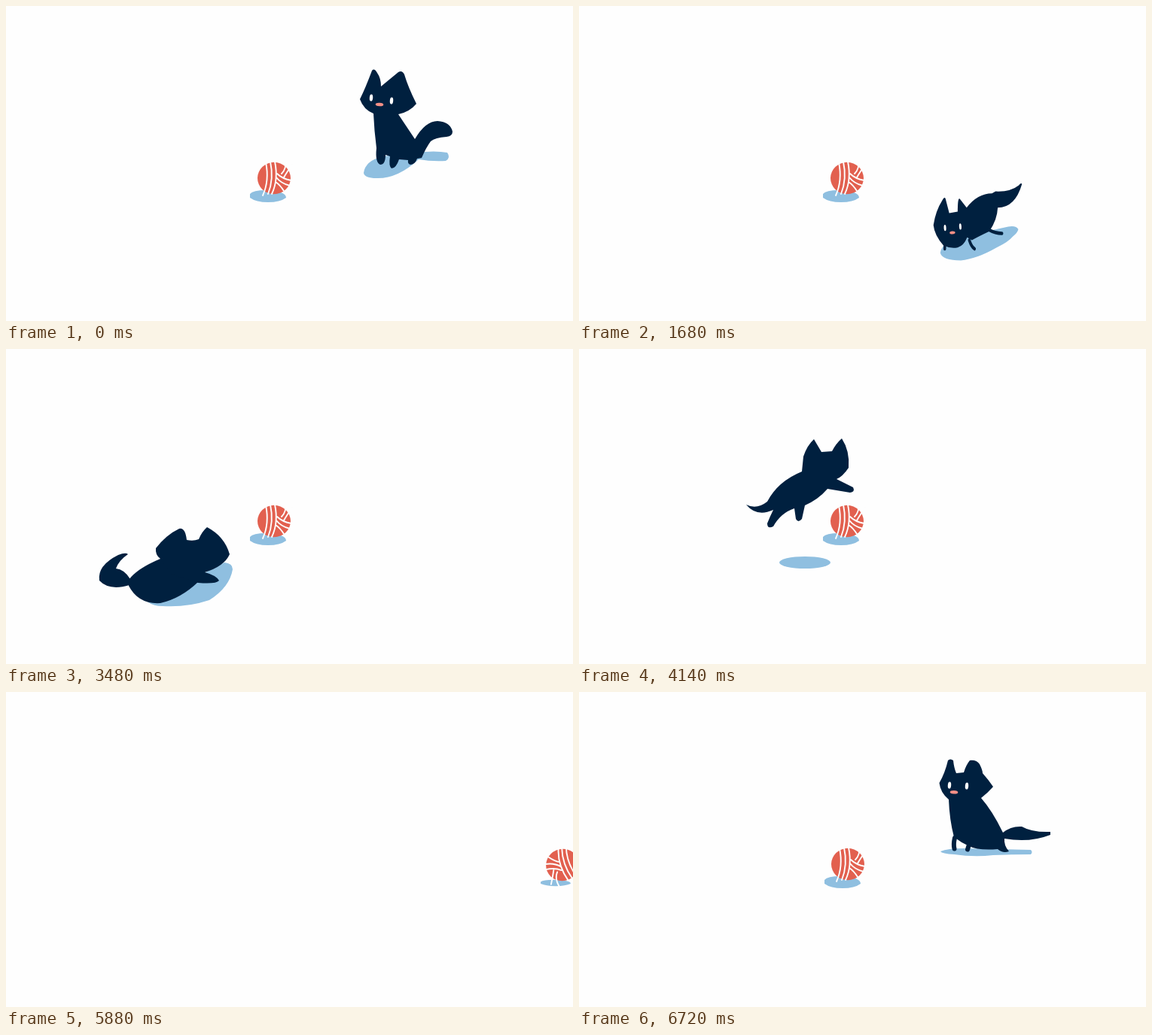
Animation of 753x419 px, one loop 6.84 s. Source, as an HTML page with a canvas:

```html
<!DOCTYPE html>
<html lang="en">
<head>
<meta charset="utf-8">
<title>Cat and yarn</title>
<style>
html, body { margin: 0; width: 100%; height: 100%; overflow: hidden; background: #fefefe; }
canvas { display: block; width: 753px; height: 419px; }
</style>
</head>
<body>
<canvas id="stage"></canvas>
<script>
const W = 753, H = 419, LOOP = 6840, STEP = 120;
const NAVY = '#00203f', BLUE = '#8fbfe0', RED = '#e2604f', PINK = '#f58f86', WHITE = '#fefefe';
const canvas = document.getElementById('stage');
const ctx = canvas.getContext('2d');
const dpr = window.devicePixelRatio || 1;
canvas.width = W * dpr;
canvas.height = H * dpr;

const path = d => new Path2D(d);

function fill(shape, color) {
  ctx.fillStyle = color;
  ctx.fill(shape);
}

function line(shape, color, width) {
  ctx.strokeStyle = color;
  ctx.lineWidth = width;
  ctx.lineCap = ctx.lineJoin = 'round';
  ctx.stroke(shape);
}

function oval(x, y, rx, ry, color, turn = 0) {
  ctx.fillStyle = color;
  ctx.beginPath();
  ctx.ellipse(x, y, rx, ry, turn, 0, Math.PI * 2);
  ctx.fill();
}

function group(draw) {
  ctx.save();
  draw();
  ctx.restore();
}

// Yarn, drawn around its own centre
const strands = path('M-11-21Q-6 3-15 23M-5-22Q0 1-8 21M1-22Q6 2-3 21' +
  'M15-25Q17-13 10-6M24-18Q17-8 13-1M4-6Q11 1 23 3M3-1Q9 7 21 10M2 5Q8 9 13 17');
const yarnShadow = path('M-24-3Q-20-8-3-8Q24-7 24 2Q16 8 0 8Q-16 8-24 2Z');

function yarn(x, y, turn, size = 1) {
  group(() => {
    ctx.translate(x, y);
    ctx.rotate(turn);
    ctx.scale(size, size);
    oval(0, 0, 22, 21.2, RED);
    line(strands, WHITE, 1.9);
  });
}

function groundYarn(x = 356, shadowX = 348, turn = 0, far = 0) {
  group(() => {
    ctx.translate(shadowX, 253 + far);
    ctx.scale(1 - far * 0.17, 1 - far * 0.48);
    fill(yarnShadow, BLUE);
  });
  yarn(x, 229 + far, turn);
}

// Cat poses; "at" is the point used for placing, scaling and turning
const sit = {
  at: [530, 205],
  shadow: path('M475 222Q477 206 500 200L545 195Q570 192 586 195Q591 202 584 206Q565 207 548 204Q520 230 492 229Q476 229 475 222Z'),
  body: path('M486 86Q489 82 493 89Q498 96 498 107L521 88Q526 85 529 91Q534 108 545 130Q536 141 521 144' +
    'L543 177Q557 153 573 153Q590 154 593 167Q593 173 585 174Q570 175 564 180Q558 188 552 202L546 203' +
    'Q543 211 537 211Q533 210 534 205L522 204Q518 216 512 216Q508 213 510 200L504 198Q504 211 497 211' +
    'Q490 208 492 189Q489 166 488 143Q475 138 470 124Q477 110 486 86Z'),
  eyes: [[485, 122], [512, 126]], nose: [496, 131]
};

const prowl = {
  at: [547, 230],
  shadow: path('M469 240Q473 234 488 236L600 255Q617 268 617 275Q613 286 578 286Q548 284 510 267Q487 258 480 251Q470 245 469 240Z'),
  body: path('M462 173Q464 171 468 175Q484 185 512 184L519 187Q546 187 567 208L580 195Q584 192 584 214L600 216' +
    'L607 195Q609 191 613 197Q626 213 630 234Q628 249 611 264Q598 269 584 267Q572 264 566 252L557 256' +
    'Q543 250 524 243Q509 226 508 208Q475 208 462 173Z'),
  legs: path('M524 241Q513 246 500 246M562 256Q558 266 552 269M608 260L608.5 269'),
  legWidth: 5,
  eyes: [[579, 236], [608, 238]], nose: [594, 245]
};

const back = {
  at: [222, 340],
  shadow: path('M168 336Q170 330 190 334L260 343Q275 360 273 371Q266 381 245 378Q205 368 184 353Q169 342 168 336Z'),
  body: path('M194 207Q197 203 200 209Q204 216 204 234L207 235Q220 219 232 214Q241 212 242 222Q244 246 251 268' +
    'Q244 275 235 279Q239 286 250 294Q269 310 271 333L262 346Q226 345 207 338Q183 331 176 316' +
    'Q172 295 180 272Q168 264 166 249Q170 228 194 207Z'),
  legs: path('M177 313L186.500 340M190 325Q196 336 207 342M222 341L231 357M239 342L248 354'),
  legWidth: 6,
  tail: path('M262 334Q283 331 297 336Q310 343 326 340Q328 342 321 347Q308 357 288 353Q272 351 262 347Z'),
  pivot: [264, 341]
};

const stalk = {
  at: [230, 342],
  shadow: path('M189 337L290 284Q301 285 301 293Q297 317 270 334Q240 344 208 342Q196 342 189 337Z'),
  body: path('M199 265Q213 247 230 239Q238 237 240 254Q249 256 256 253Q260 243 267 237Q290 249 297 273' +
    'Q290 289 264 297Q279 301 283 308Q279 313 255 311L220 300L205 279Q198 274 199 265Z'),
  rump: path('M205 279Q174 292 163 307V315Q176 340 205 338Q232 332 255 310L268 285Z'),
  tail: path('M165 306Q157 293 146 292Q150 281 162 273Q159 270 149 274Q121 288 124 308Q137 322 164 314Z'),
  pivot: [163, 310]
};

const leap = {
  at: [293, 180],
  shadow: path('M266 284a34 8 0 1 0 68 0a34 8 0 1 0-68 0'),
  body: path('M222 207Q236 214 250 203Q264 176 296 163L298 143Q303 128 312 120L322 137L336 136Q341 126 349 119' +
    'Q360 136 358 158Q350 170 342 173L364 184Q367 190 360 191L330 186Q318 200 300 208L296 226' +
    'Q291 232 288 226L286 212Q268 218 258 236Q250 240 250 232Q254 222 258 214Q236 224 222 207Z')
};

const hug = {
  at: [555, 205],
  shadow: path('M505 256Q506 249 520 248L612 246Q620 251 629 251Q619 253 614 258Q595 260 540 260Q510 260 505 256Z'),
  behind: () => yarn(571, 216, 1.75, 0.83),
  body: path('M594 141Q598 138 598 147Q596 156 599 168Q602 184 591 194Q578 203 557 197Q551 212 557 226Q569 237 569 249' +
    'Q564 261 546 261Q520 258 514 230Q514 184 553 163V159Q572 147 594 141Z'),
  rump: path('M567 239Q580 235 596 237Q609 233 618 228Q622 226 620 232Q610 247 595 248Q579 249 567 243Z'),
  legs: path('M553 205L568 204.500M554 228Q568 225 573 220'),
  legWidth: 2.6,
  squint: path('M584 182.500L589 181.500L588 185L585 188')
};

const perch = {
  at: [530, 212],
  shadow: path('M480 212Q490 208 510 208L600 210Q603 213 600 216Q575 216 550 217Q525 220 498 216Q482 215 480 212Z'),
  body: path('M490 91Q493 88 497 91Q498 101 501 108L511 107Q514 97 519 91Q528 90 532 96Q536 104 536 108' +
    'Q544 117 550 126Q543 134 534 141Q549 158 563 187Q574 178 588 179Q602 187 626 186V190Q598 201 565 195' +
    'Q564 204 571 212Q563 215 556 209Q530 211 518 205Q507 200 498 193Q492 170 491 143Q480 134 478.500 121Q486 108 490 91Z'),
  legs: path('M499 194Q497 203 498.500 208.500M518 203L516 209.500'),
  legWidth: 6,
  eyes: [[492, 124], [515, 125]], nose: [498, 133.3]
};

function cat(pose, { x = pose.at[0], y = pose.at[1], sx = 1, sy = 1, turn = 0, tail = 0, sway = 0 } = {}) {
  const place = angle => {
    ctx.translate(x, y);
    ctx.rotate(angle);
    ctx.scale(sx, sy);
    ctx.translate(-pose.at[0], -pose.at[1]);
  };
  group(() => {
    place(0);
    fill(pose.shadow, BLUE);
  });
  group(() => {
    place(turn);
    if (pose.behind) pose.behind();
    group(() => {
      ctx.translate(sway, 0);
      if (pose.rump) fill(pose.rump, NAVY);
      if (!pose.tail) return;
      const [px, py] = pose.pivot;
      ctx.translate(px, py);
      ctx.rotate(tail);
      ctx.translate(-px, -py);
      fill(pose.tail, NAVY);
    });
    fill(pose.body, NAVY);
    if (pose.legs) line(pose.legs, NAVY, pose.legWidth);
    if (pose.squint) line(pose.squint, WHITE, 1.7);
    for (const [ex, ey] of pose.eyes || []) oval(ex, ey, 2.2, 4.6, WHITE, 0.08);
    if (pose.nose) oval(pose.nose[0], pose.nose[1], 5.3, 2.2, PINK, 0.04);
  });
}

const pick = (k, ...draws) => draws[k]();
const run = (x, y, sx, sy = 1, turn = 0) => cat(prowl, { x, y, sx, sy, turn });
const tumble = n => cat(hug, { x: 555 + n * 60, y: 205 - Math.min(n, 0) * 5, turn: n * Math.PI / 2 });

function rollIn(k) {
  const left = Math.pow(1 - k / 5, 1.3);
  const x = 357 + 382 * left;
  groundYarn(x, x - 7 - left * 2, left * (Math.PI * 5 - 0.4), left);
  if (k > 3) run(k > 4 ? 671 : 722, 172, -0.9, 0.9);
}

// Each phase: start time, number of steps, drawing of step k
const phases = [
  [0, 1, () => { groundYarn(); cat(sit); }],
  [180, 3, k => {
    groundYarn();
    if (k < 2) cat(sit, { x: 530 - k * 14, y: 205 + k * 8, sy: 0.97 - k * 0.17 });
    else run(510, 204, -1.08);
  }],
  [600, 5, k => {
    groundYarn();
    pick(k,
      () => run(512, 206, -1, 0.95),
      () => run(530, 218, 0.6, 0.95),
      () => run(547, 230, 1),
      () => run(551, 232, 0.94, 0.94),
      () => run(552, 232, 0.92, 0.9));
  }],
  [1260, 1, () => { groundYarn(); run(552, 233, 0.9, 0.88); }],
  [1440, 4, k => {
    groundYarn();
    run(550 - k * 10.6, 240 + k * 24, k ? -0.4 - k * 0.15 : 0.75, 0.9, k ? 0 : 0.1);
  }],
  [1980, 6, k => {
    groundYarn();
    if (k < 2) run(430 - k * 115, 322 + k * 3, -1 - k * 0.05, 0.92);
    else pick(k - 2,
      () => cat(back, { x: 242, sx: 0.88, sy: 0.9 }),
      () => cat(back),
      () => cat(back, { sy: 1.03, tail: -0.5 }),
      () => cat(back, { sy: 1.05, tail: -1.05 }));
  }],
  [2760, 2, k => {
    groundYarn();
    if (k) cat(stalk, { sy: 1.02, tail: 1.7 });
    else cat(back, { sy: 0.9, tail: -1.1 });
  }],
  [3060, 1, () => { groundYarn(); cat(stalk, { tail: 1.7 }); }],
  [3240, 5, k => {
    groundYarn();
    const wag = Math.sin((k - 2) * Math.PI / 2);
    cat(stalk, { tail: wag * 0.35, sway: wag * 3 });
  }],
  [3900, 3, k => {
    groundYarn();
    pick(k,
      () => cat(stalk, { sy: 0.92, tail: 0.3 }),
      () => cat(leap, { x: 235, y: 230, sx: 1.1, turn: -0.1 }),
      () => cat(leap));
  }],
  [4320, 6, k => {
    if (k) return tumble(k - 4);
    groundYarn();
    cat(leap, { x: 330, y: 188, turn: 0.6 });
  }],
  [5040, 3, k => { if (k < 2) tumble(k + 2); }],
  [5880, 6, rollIn],
  [6600, 2, k => {
    groundYarn(357, 350);
    if (k) cat(perch);
    else run(588, 168, -0.85, 0.9);
  }]
];

function frame(now) {
  const t = now % LOOP;
  const [start, steps, draw] = phases.filter(p => p[0] <= t).pop();
  ctx.setTransform(dpr, 0, 0, dpr, 0, 0);
  ctx.fillStyle = WHITE;
  ctx.fillRect(0, 0, W, H);
  draw(Math.min(steps - 1, Math.floor((t - start) / STEP)));
}

let began;
function tick(now) {
  if (began === undefined) began = now;
  frame(Math.max(0, now - began));
  requestAnimationFrame(tick);
}
frame(0);
requestAnimationFrame(tick);
</script>
</body>
</html>
```
